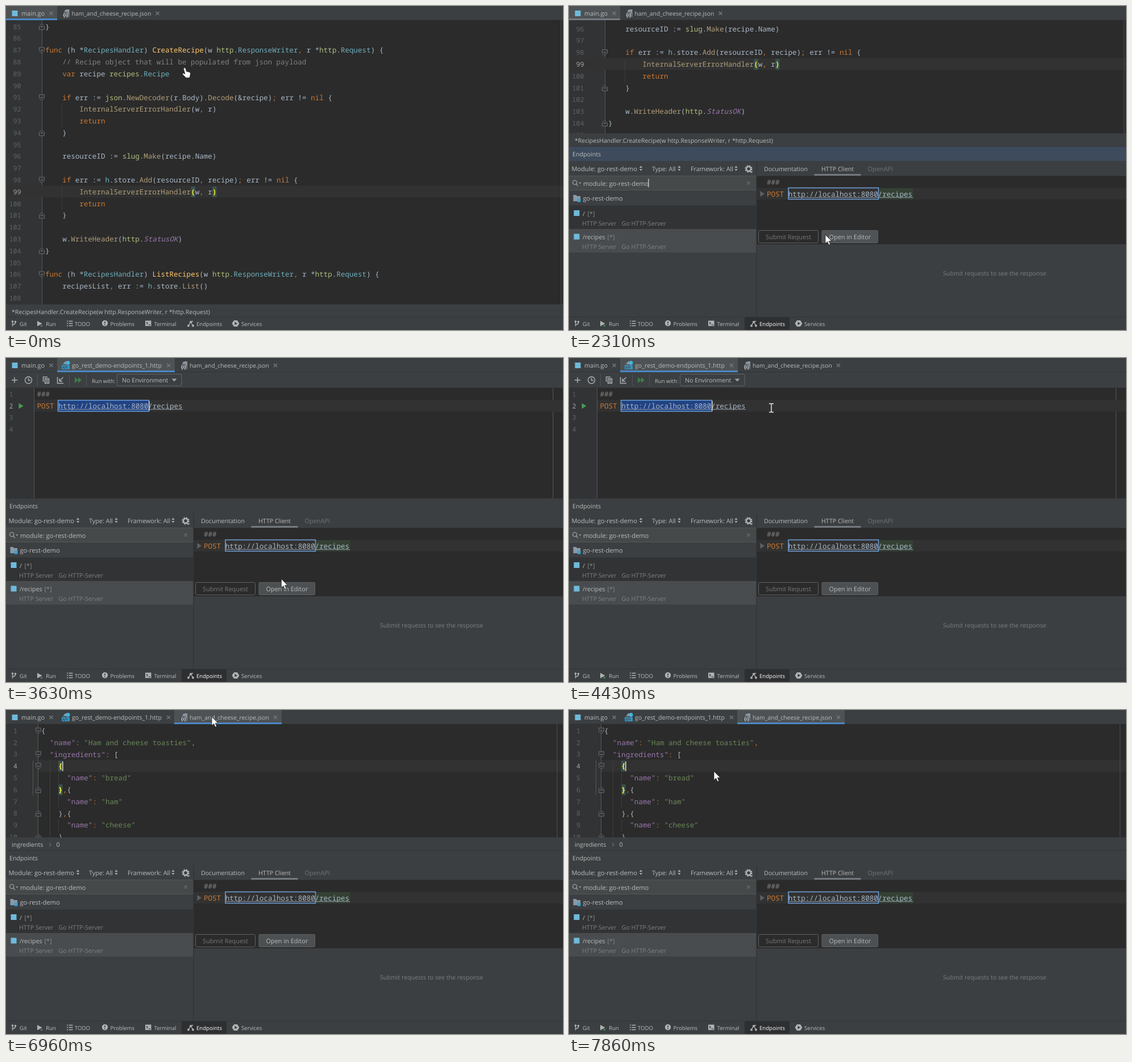
Write an HTML page that moves like this. It is 980x571 px and loops after 8 s.

```html
<!DOCTYPE html>
<html lang="en">
<head>
<meta charset="utf-8">
<title>REST endpoints in an editor</title>
<style>
html, body { margin: 0; width: 100%; height: 100%; overflow: hidden; background: #3c3f41; }
svg { display: block; width: 980px; height: 571px; }
text { white-space: pre; text-rendering: geometricPrecision; }
.u { font-family: "Open Sans", "Noto Sans", sans-serif; fill: #bbb; }
.m { font: 12.56px "Noto Sans Mono", "DejaVu Sans Mono", monospace; font-variant-ligatures: none; }
.n { font-size: 11.7px; fill: #606366; }
.now { fill: #a4a3a3; }
.d { fill: #a9b7c6; } .k { fill: #cc7832; } .t { fill: #6fafbd; } .f { fill: #ffc66d; }
.g { fill: #b09d79; } .p { fill: #afbf7e; } .c { fill: #808080; } .s { fill: #6a8759; }
.v { fill: #9876aa; } .o { fill: #9876aa; font-style: italic; } .b { fill: #ffef28; font-weight: 700; }
.i { fill: none; stroke: #afb1b3; stroke-width: 1.4; }
</style>
</head>
<body>
<svg id="stage" viewBox="0 0 980 571"></svg>
<script>
const LOOP = 8000, ADV = 7.536, ROW = 20.79;

// Drawing helpers, all returning markup
const esc = s => s.replace(/&/g, '&amp;').replace(/</g, '&lt;');
const rect = (x, y, w, h, fill, more = '') =>
  `<rect x="${x}" y="${y}" width="${w}" height="${h}" fill="${fill}" ${more}/>`;
const path = (d, fill = 'none', more = '') => `<path d="${d}" fill="${fill}" ${more}/>`;
const line = (d, color, w = 1) => path(d, 'none', `stroke="${color}" stroke-width="${w}"`);
const icon = (d, more = '') => `<path class="i" d="${d}" ${more}/>`;
const dot = (x, y, r, fill) => `<circle cx="${x}" cy="${y}" r="${r}" fill="${fill}"/>`;
const group = (id, body) => `<g id="${id}">${body}</g>`;
const label = (x, y, s, size = 10.7, color = '#bbb') =>
  `<text class="u" x="${x}" y="${y}" style="font-size:${size}px;fill:${color}">${esc(s)}</text>`;
const cross = (x, y, color = '#7c7f81') => line(`M${x - 3} ${y - 3}l6 6m0 -6l-6 6`, color, 1.1);
const goMark = (x, y) => rect(x - 5, y - 5, 10, 10, '#6fb9dc');

// Runs are split by "|"; the first letter of each run is its colour class
function code(x, y, source) {
  let col = 0, out = '';
  for (const run of source.split('|')) {
    const s = run.slice(1), lead = s.length - s.trimStart().length;
    out += `<text class="m ${run[0]}" x="${x + (col + lead) * ADV}" y="${y}">${esc(s.trim())}</text>`;
    col += s.length;
  }
  return out;
}
const number = (x, y, n, now, anchor = 'end') =>
  `<text class="m n ${now ? 'now' : ''}" x="${x}" y="${y}" text-anchor="${anchor}">${n}</text>`;
const fold = (x, y, end) =>
  path(end ? `M${x - 4.5} ${y + 5}v-6l4.5 -4l4.5 4v6z` : `M${x - 4.5} ${y - 5}v6l4.5 4l4.5 -4v-6z`,
    '#313335', 'stroke="#6a6d6f"') + line(`M${x - 2} ${y}h4`, '#8a8d8f');
const caret = (x, y) => rect(x, y - 8.5, 1.6, 17, '#d0d0d0');

// Go source
const goLines = [
  'd}', '',
  'kfunc|d (h *|tRecipesHandler|d) |fCreateRecipe|d(w |phttp|d.|tResponseWriter|k,|d r *|phttp|d.|tRequest|d) {',
  'c    // Recipe object that will be populated from json payload',
  'k    var|d recipe |precipes|d.|tRecipe', '',
  'k    if|d err := |pjson|d.|gNewDecoder|d(r.Body).|gDecode|d(&recipe)|k;|d err != |knil|d {',
  'g        InternalServerErrorHandler|d(w|k,|d r)',
  'k        return', 'd    }', '',
  'd    resourceID := |pslug|d.|gMake|d(recipe.Name)', '',
  'k    if|d err := |th|d.store.|gAdd|d(resourceID|k,|d recipe)|k;|d err != |knil|d {',
  'g        InternalServerErrorHandler|b(|dw|k,|d r|b)',
  'k        return', 'd    }', '',
  'd    w.|gWriteHeader|d(|phttp|d.|oStatusOK|d)', 'd}', '',
  'kfunc|d (h *|tRecipesHandler|d) |fListRecipes|d(w |phttp|d.|tResponseWriter|k,|d r *|phttp|d.|tRequest|d) {',
  'd    recipesList|k,|d err := |th|d.store.|gList|d()', ''
];
const goY = n => 36.5 + (n - 85) * ROW;

function goEditor() {
  const y = goY(99);
  let out = rect(0, y - 11, 980, 20.8, '#323232') +
    rect(325.5, y - 9.5, 7.5, 19, '#3b514d') + rect(363, y - 9.5, 7.5, 19, '#3b514d');
  for (const n of [92, 99]) out += line(`M98.5 ${goY(n) - 10}v41`, '#3d3d3d');
  goLines.forEach((s, k) => {
    const n = 85 + k;
    out += number(26.5, goY(n) + 4.2, n, n === 99) + (s ? code(69, goY(n) + 4.3, s) : '');
  });
  for (const n of [87, 91, 98, 106]) out += fold(63, goY(n), false);
  for (const n of [85, 94, 101, 104]) out += fold(63, goY(n), true);
  return rect(0, 25, 980, 501, '#2b2b2b') + rect(0, 25, 63, 501, '#313335') +
    line('M63.5 25V526', '#555759') + group('goText', out) + line('M976.5 25V526', '#46484a');
}
const handlerPath = '*RecipesHandler.CreateRecipe(w http.ResponseWriter, r *http.Request)';
const goCrumb = y => rect(0, y, 980, 23, '#3c3f41') + label(10, y + 16.5, handlerPath, 10.53);

// HTTP request file
const restY = n => 63.6 + (n - 1) * ROW;

function restEditor() {
  const copy = 'M65.5 42V33.5H73M68.5 36.5h7v8h-7zM70 39h4M70 42h4';
  let out = rect(0, 25, 980, 222, '#2b2b2b') + rect(0, 25, 980, 27, '#3c3f41') +
    line('M0 52.5H980', '#323232') +
    icon('M15 34v10M10 39h10') +
    icon('M33.5 39a6 6 0 1 0 12 0a6 6 0 1 0 -12 0M39.5 35v4.5h3.5') +
    group('copyIcon', icon(copy)) +
    icon('M90.5 33.5V44.5H101M100.5 34L94 40.5M94 36v4.8h5') +
    path('M121 34l6 5l-6 5zM127 34l6 5l-6 5z', '#3f7d48') +
    line('M55.5 29v20M111.5 29v20M141.5 29v20', '#515456') +
    label(151, 43.5, 'Run with:', 9.45) +
    rect(195.5, 28.5, 113.5, 20.5, '#3c3f41', 'rx="2" stroke="#646668"') +
    label(204, 43, 'No Environment') + path('M291.5 36.5h9l-4.5 5z', '#9da0a2') +
    rect(0, 53, 49, 194, '#313335') + line('M49.5 53V247M962.5 53V247', '#555759') +
    `<rect id="restRow" x="50" width="930" height="20.8" fill="#323232"/>` +
    group('picked', rect(91.5, 74.5, 160, 19.5, '#214283', 'stroke="#6fa3dc" stroke-width="1.4"')) +
    group('restNumbers', '');
  out += code(54.5, restY(1) + 4.3, 'c###') +
    code(54.5, restY(2) + 4.3, 'kPOST |dhttp://localhost:8080/recipes') +
    group('underline', line('M92 90.5H311', '#8f9ba8')) +
    group('runIcon', path('M22.5 79.5l8 5l-8 5z', '#499c54')) +
    group('restCaret', caret(0, 0));
  return out;
}

// JSON file
const jsonLines = [
  'd{', 'v  "name"|k:|s "Ham and cheese toasties"|k,', 'v  "ingredients"|k:|d [', 'd    {',
  'v      "name"|k:|s "bread"', 'd    }|k,|d{', 'v      "name"|k:|s "ham"', 'd    }|k,|d{',
  'v      "name"|k:|s "cheese"', 'd    }'
];
const jsonY = n => 36.7 + (n - 1) * ROW;

function jsonEditor() {
  const y = jsonY(4);
  let out = rect(0, 25, 980, 200, '#2b2b2b') + rect(0, 25, 57, 200, '#313335') +
    rect(57, y - 11, 923, 20.8, '#323232') + line('M56.5 25V225', '#555759') +
    line('M77.5 89V225', '#3d3f41');
  for (const n of [5, 7, 9]) out += line(`M92.5 ${jsonY(n) - 10}v20`, '#3d3f41');
  out += group('plainMarks', line(`M47.5 ${y - 10}V150`, '#555759') +
      rect(92, y - 9.5, 7.5, 19, '#3b514d') + rect(92, jsonY(6) - 9.5, 7.5, 19, '#3b514d')) +
    group('allPicked', rect(62, 25, 918, 200, '#214283')) +
    line('M969.5 25V225', '#4b4e51');
  jsonLines.forEach((s, k) => {
    const n = k + 1;
    out += number(20, jsonY(n) + 4.2, n, n === 4) + code(62, jsonY(n) + 4.3, s);
  });
  for (const n of [1, 3, 4]) out += fold(57, jsonY(n), false);
  for (const n of [6, 8, 10]) out += fold(57, jsonY(n), true);
  return out + group('braces', code(92, y + 4.3, 'b{') + code(92, jsonY(6) + 4.3, 'b}')) +
    caret(99, y) + rect(0, 224.5, 980, 23, '#3c3f41') +
    label(10, 241, 'ingredients', 10.56) + line('M76 234l3 3l-3 3', '#85888a') + label(88.5, 241, '0');
}

// Endpoints tool window
function panel() {
  const sorter = x => path(`M${x - 2.7} 285l2.7 -3.2l2.7 3.2zM${x - 2.7} 287.2l2.7 3.2l2.7 -3.2z`, '#afb1b3');
  const server = (y, name, x) => goMark(13.5, y) + label(24, y + 4.5, name) +
    label(x, y + 4.5, '[*]', 10.7, '#8c8c8c') +
    label(23, y + 21.5, 'HTTP Server', 10.55, '#808385') +
    label(92.5, y + 21.5, 'Go HTTP-Server', 10.65, '#808385');
  const gear = `<circle cx="316" cy="287" r="4" fill="none" stroke="#afb1b3" stroke-width="2.4"/>` +
    `<circle cx="316" cy="287" r="5.6" fill="none" stroke="#afb1b3" stroke-width="2" stroke-dasharray="2.4 2"/>` +
    path('M318.5 291.5h5l-2.5 3z', '#afb1b3');
  const client = rect(330, 300, 650, 120, '#2b2b2b') + rect(330, 320.5, 650, 20.5, '#323232') +
    code(348, 315.2, 'c###') + path('M336.5 326l7.5 5l-7.5 5z', '#5e6163') +
    rect(546, 321, 59.5, 19.5, '#344134') +
    code(348, 335.5, 'kPOST |dhttp://localhost:8080/recipes') + line('M386 337.5H605', '#8f9ba8') +
    rect(386, 320.5, 158.5, 20, 'none', 'stroke="#6fa3dc" stroke-width="1.5"') +
    rect(333.5, 395.5, 105, 22, '#2b2b2b', 'rx="2" stroke="#5e6163"') +
    label(346, 411, 'Submit Request', 10.86, '#777') +
    `<rect id="openButton" x="445" y="395.5" width="98.5" height="22" rx="2" stroke="#5e6163"/>` +
    label(457.5, 411, 'Open in Editor', 10.95) +
    label(658, 475, 'Submit requests to see the response', 10.66, '#7c7f81');
  return rect(0, 247, 980, 302, '#3c3f41') +
    `<rect id="header" x="0" y="248" width="980" height="25"/>` + line('M0 247.5H980', '#323537') +
    label(6, 264.5, 'Endpoints') +
    label(4.5, 290.5, 'Module: go-rest-demo', 11.15) + sorter(126.5) +
    label(146, 290.5, 'Type: All', 10.8) + sorter(194) +
    label(214, 290.5, 'Framework: All', 10.86) + sorter(294) + gear +
    rect(0, 299, 329.5, 25, '#45494a') + line('M0 299.5H330M0 324.5H330', '#53575a') +
    icon('M6.5 311a3.6 3.6 0 1 0 7.2 0a3.6 3.6 0 1 0 -7.2 0M12.8 314l3 3', 'style="stroke:#9a9da0"') +
    path('M17 311h4.5l-2.2 2.6z', '#9a9da0') +
    label(25, 317, 'module: go-rest-demo', 11.1) + cross(316, 312, '#666a6c') +
    group('searchCaret', rect(139.3, 304.5, 1.2, 15, '#ddd')) +
    path('M7.5 333h5l1.5 2h6v9h-12.5z', '#8b99a5') + rect(14.5, 339.5, 6, 6, '#40a0cf') +
    label(24.5, 343, 'go-rest-demo', 11.18) +
    rect(0, 351.5, 329.5, 41.5, '#313335') + rect(0, 393, 329.5, 41.5, '#484c4f') +
    server(365, '/', 32.5) + server(406.5, '/recipes', 67.5) +
    label(343, 291, 'Documentation', 10.6) + label(444, 291, 'HTTP Client', 10.6) +
    label(525.5, 291, 'OpenAPI', 10.9, '#707375') + line('M330 299.5H980', '#323537') +
    rect(431.5, 296, 82, 3, '#747a80') + group('client', client) + line('M330 273V548', '#2f3234');
}

// Tabs
const goTab = goMark(15.5, 13) + label(27, 17, 'main.go', 10.87) + cross(79.5, 13);
const jsonTab = x => path(`M${x + 2} 8l3.5 -2h5v13h-8.5z`, '#8b959d') +
  `<text class="m" x="${x - 2}" y="19" style="font-size:10px;font-weight:700;fill:#c3cbd1;stroke:#3c3f41;stroke-width:2;paint-order:stroke">{}</text>` +
  label(x + 14.5, 17, 'ham_and_cheese_recipe.json', 10.33) + cross(x + 165.5, 13);
const restTab = path('M100 11l4 -5h6v5z', '#8b959d') + dot(109, 8.5, 3.4, '#40b6e0') +
  rect(98, 12.5, 14, 7.5, '#3993bd') + label(98.8, 18.9, 'API', 6.6, '#22343d') +
  label(116, 17, 'go_rest_demo-endpoints_1.http') + cross(286, 13);
const activeTab = (x, w) => rect(x, 0, w, 25, '#4e5254');
const bar = rect(0, 0, 980, 25, '#3c3f41') + line('M0 24.5H980', '#323537');
const blueLine = (x, w) => rect(x, 22, w, 3, '#4a88c7');

// Bottom tool bar
function toolBar() {
  const item = (x, s, color) => label(x, 564, s, 9.6, color);
  return rect(0, 548, 980, 23, '#3c3f41') + line('M0 548.5H980', '#323537') +
    icon('M11.5 556v8.5M11.5 561.5q5 0 5 -4') + dot(11.5, 556, 1.8, '#afb1b3') + dot(16.5, 556.5, 1.8, '#afb1b3') +
    item(24, 'Git') + path('M55 555l8.5 4.8l-8.5 4.8z', '#afb1b3') + dot(62.5, 563.5, 1.5, '#499c54') + item(70, 'Run') +
    icon('M107 555.5h2M110.5 555.5h7M107 559.5h2M110.5 559.5h7M107 563.5h2M110.5 563.5h7') + item(121, 'TODO') +
    dot(174, 559, 5.2, '#afb1b3') + line('M174 556v3.6M174 560.8v1.6', '#3c3f41', 1.6) + item(183.5, 'Problems') +
    rect(245, 554.5, 10.5, 9.5, '#afb1b3') + line('M247 557l2.3 2l-2.3 2M250.5 561.8h3.5', '#3c3f41', 1.2) + item(260.5, 'Terminal') +
    item(335, 'Endpoints') +
    group('pressed', rect(309, 548, 79, 23, '#2d2f30') + item(335, 'Endpoints', '#fff')) +
    icon('M321 563.5L325 556.5L329 563.5M325 556.5l4 -1') + dot(321, 563.5, 2, '#afb1b3') + dot(329, 563.5, 2, '#afb1b3') +
    dot(325, 557, 2, '#afb1b3') +
    path('M401 554h6l3.5 5.5l-3.5 5.5h-6l-3.5 -5.5z', '#afb1b3') + path('M402.5 556.8l4.5 2.7l-4.5 2.7z', '#3c3f41') +
    item(414, 'Services');
}

const pointer = group('mouse',
  group('arrow', path('M0 0V15.5L3.6 12.2L6.2 18L8.7 17L6.2 11.3H11Z', '#fff', 'stroke="#222" stroke-width=".8"')) +
  group('hand', path('M-.8 0Q1.4 -.8 2.1 1.2L3.5 6.2L9 7.6Q10.9 8.6 10.5 11L9 17.6H2.8L-3.2 11.4Q-4 9.4 -2 9.2L1 10.8L-1.7 1.6Z',
    '#fff', 'stroke="#222" stroke-width=".8"')) +
  group('beam', line('M-4 -7.5H-1L0 -6.5L1 -7.5H4M0 -6.5V6.5M-4 7.5H-1L0 6.5L1 7.5H4', '#e6e6e6', 1.5)));

document.getElementById('stage').innerHTML =
  group('go', goEditor() + goCrumb(526)) + group('rest', restEditor()) + group('json', jsonEditor()) +
  group('crumb', goCrumb(224.5)) + group('panel', panel()) +
  group('tabsGo', bar + activeTab(0, 90) + rect(0, 22, 90, 3, '#747a80') +
    group('goFocus', blueLine(0, 90)) + goTab + jsonTab(101)) +
  group('tabsRest', bar + activeTab(90, 207) + blueLine(90, 207) + goTab + restTab + jsonTab(308.5)) +
  group('tabsJson', bar + activeTab(296, 189) + blueLine(296, 189) + goTab + restTab + jsonTab(308.5)) +
  toolBar() + pointer;

const el = {};
document.querySelectorAll('[id]').forEach(e => el[e.id] = e);
const show = (id, on) => { el[id].style.display = on ? '' : 'none'; };

// Pointer moves: start, number of 100 ms steps, end point
const moves = [
  [100, 9, 335, 556], [2010, 4, 451, 403], [2410, 4, 489, 400], [3630, 9, 356, 88],
  [4550, 1, 361, 83], [4650, 3, 345, 70], [5950, 1, 350.5, 70], [6360, 5, 362, 12], [7370, 5, 255, 108]
];
function mouseAt(t) {
  let x = 314, y = 109;
  for (const [start, steps, endX, endY] of moves) {
    if (t < start) break;
    const k = Math.min(1, (Math.floor((t - start) / 100) + 1) / steps), e = k * k * (3 - 2 * k);
    x += (endX - x) * e;
    y += (endY - y) * e;
  }
  return [x, y];
}

// Request file: start, current line, caret x, line count
const edits = [[2830, 1, 54.3, 4], [3230, 2, 251, 4], [4750, 2, 311, 4], [5150, 3, 54.3, 5], [5650, 4, 54.3, 6]];
let lastEdit;
function drawRest(t) {
  const edit = edits.filter(e => t >= e[0]).pop();
  const [start, current, x, count] = edit;
  show('restRow', current > 1);
  show('picked', start === 3230);
  show('underline', current > 1);
  show('runIcon', t >= 3630);
  el.copyIcon.style.opacity = t >= 4750 ? .35 : 1;
  if (edit === lastEdit) return;
  lastEdit = edit;
  el.restRow.setAttribute('y', restY(current) - 10.6);
  el.restCaret.setAttribute('transform', `translate(${x} ${restY(current)})`);
  el.restNumbers.innerHTML = Array.from({ length: count }, (_, k) =>
    number(5.5, restY(k + 1) + 4.2, k + 1, k + 1 === current, 'start')).join('');
}

function draw(t) {
  const open = t >= 1210, rest = t >= 2830 && t < 6760, json = t >= 6760, go = t < 2830;
  show('go', go);
  show('tabsGo', go);
  show('goFocus', !open);
  show('crumb', go && open);
  el.goText.setAttribute('transform', `translate(0 ${open ? -224.7 : 0})`);
  show('rest', rest);
  show('tabsRest', rest);
  if (rest) drawRest(t);
  show('json', json);
  show('tabsJson', json);
  const all = t >= 7060 && t < 7570;
  show('allPicked', all);
  show('plainMarks', !all);
  show('braces', !all);
  show('panel', open);
  show('pressed', open);
  show('client', t >= 1310);
  show('searchCaret', t < 1810 || (t >= 2310 && go));
  el.header.setAttribute('fill', go ? '#3d4b5c' : '#3c3f41');

  const [x, y] = mouseAt(t);
  const hover = x > 445 && x < 544 && y > 395 && y < 418;
  el.openButton.setAttribute('fill', hover ? '#4f5355' : '#4c5052');
  const hand = !open && y < 525, beam = rest && y > 52 && y < 246;
  el.mouse.setAttribute('transform', `translate(${x} ${y})`);
  show('mouse', t < 5150 || t >= 5950);
  show('hand', hand);
  show('beam', beam);
  show('arrow', !hand && !beam);
}

function tick() {
  draw(performance.now() % LOOP);
  requestAnimationFrame(tick);
}
tick();
</script>
</body>
</html>
```
